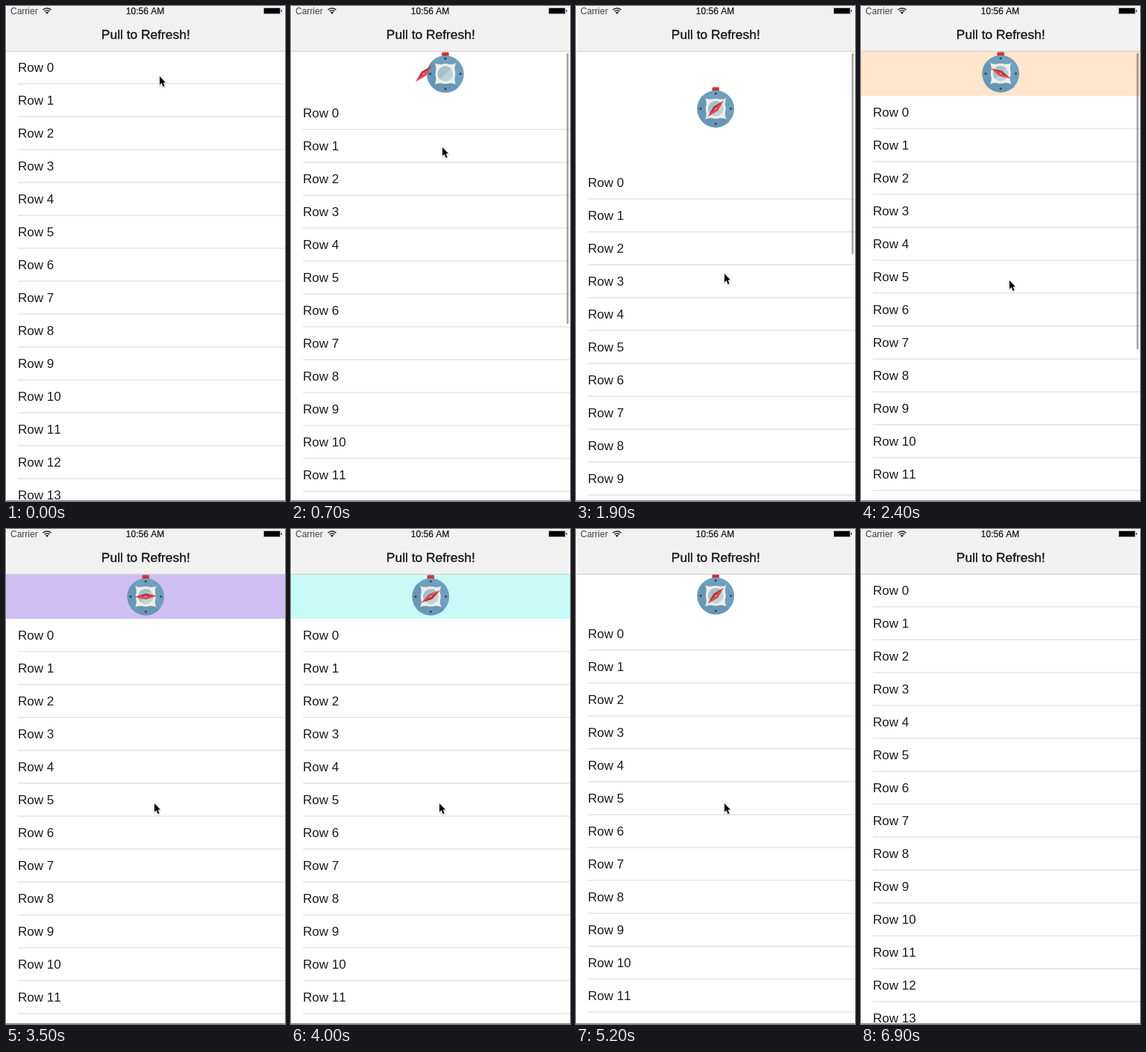
Write an HTML page with a canvas that moves like this. It is 374 px wide and 662 px high and loops after 7.2 s.

```html
<!DOCTYPE html>
<html lang="en">
<head>
<meta charset="utf-8">
<title>Pull to Refresh</title>
<style>
html, body { margin: 0; width: 100%; height: 100%; overflow: hidden; background: #fff; }
canvas { display: block; }
</style>
</head>
<body>
<canvas width="374" height="662"></canvas>
<script>
const ctx = document.querySelector('canvas').getContext('2d');
const W = 374, H = 662, NAV = 60, ROW = 44, LOOP = 7200, TICK = 100;
const PULL = 200, RELEASE = 2050, SETTLED = 2400;
const SPIN = 2160, TURN = 300, SPIN_END = 5160, CLOSE = 5150, CLOSED = 5600;
const MAX_PULL = 158.6, REST = 60;
// orange, magenta, red, blue, purple, cyan
const TINTS = [[255, 128, 0], [255, 0, 255], [255, 0, 0], [0, 0, 255], [128, 0, 128], [0, 255, 255]];

const clamp = (v, a = 0, b = 1) => Math.min(b, Math.max(a, v));
const mix = (a, b, u) => a + (b - a) * u;
const span = (t, a, b) => clamp((t - a) / (b - a));
const smooth = u => u * u * (3 - 2 * u);
const dragEase = t => 1 - (1 - span(t, PULL, RELEASE)) ** 1.35;

function rect(x, y, w, h, color) {
  ctx.fillStyle = color;
  ctx.fillRect(x, y, w, h);
}

function disc(x, y, r, color, from = 0, to = 2 * Math.PI) {
  ctx.fillStyle = color;
  ctx.beginPath();
  ctx.arc(x, y, r, from, to);
  ctx.fill();
}

function shape(points, color) {
  ctx.fillStyle = color;
  ctx.beginPath();
  points.forEach(p => ctx.lineTo(...p));
  ctx.closePath();
  ctx.fill();
}

function text(s, x, y, size, color = '#111', weight = 0, align = 'left') {
  ctx.font = `${size}px "Liberation Sans", Arial, sans-serif`;
  ctx.fontKerning = 'none';
  ctx.textAlign = align;
  ctx.fillStyle = ctx.strokeStyle = color;
  ctx.fillText(s, x, y);
  if (weight) {
    ctx.lineWidth = weight;
    ctx.strokeText(s, x, y);
  }
}

function pullOffset(t) {
  if (t < RELEASE) {
    const d = 273 * dragEase(t);
    return 0.68 * d / (1 + d / 1600);
  }
  if (t < CLOSE) return mix(MAX_PULL, REST, 1 - (1 - span(t, RELEASE, SETTLED)) ** 2.5);
  return REST * (1 - smooth(span(t, CLOSE, CLOSED)));
}

function tint(turns) {
  const i = Math.floor(turns);
  const faded = c => c.map(v => mix(255, v, 0.25));
  const from = i ? faded(TINTS[(i - 1) % 6]) : [255, 255, 255];
  const to = faded(TINTS[i % 6]);
  return `rgb(${from.map((v, k) => Math.round(mix(v, to[k], turns - i)))})`;
}

function compassBody(x, y) {
  ctx.save();
  ctx.translate(x, y);
  ctx.fillStyle = '#d9373c';
  ctx.beginPath();
  ctx.roundRect(-4.5, -28.5, 9.5, 6, 1.5);
  ctx.fill();
  rect(-2.5, -26, 5, 2, '#a8323a');
  disc(0.3, 0.6, 24.8, '#6f9fbe');
  disc(0.3, 0.6, 24.8, '#6897b7', Math.PI / 4, Math.PI * 5 / 4);
  for (let k = 0; k < 4; k++) {
    ctx.save();
    ctx.translate(0.3, 0.3);
    ctx.rotate(k * Math.PI / 2);
    disc(20.3, 0, 1.6, '#4a4446');
    // horn with concave sides
    ctx.rotate(Math.PI / 4);
    ctx.fillStyle = '#eeeee8';
    ctx.beginPath();
    ctx.moveTo(20, 0);
    ctx.quadraticCurveTo(14, -2, 10, -9);
    ctx.lineTo(10, 9);
    ctx.quadraticCurveTo(14, 2, 20, 0);
    ctx.fill();
    ctx.restore();
  }
  disc(0.3, 0.3, 13.3, '#eeeee8');
  disc(0.3, 0.3, 10.3, '#bcd3dc');
  disc(0.3, 0.3, 10.3, '#a5c0cc', Math.PI * 3 / 4, Math.PI * 7 / 4);
  ctx.restore();
}

function needle(x, y, turns) {
  ctx.save();
  ctx.translate(x, y);
  ctx.rotate((turns - 0.5) * Math.PI / 2);
  shape([[-15.5, 0], [0, -4], [15.5, 0]], '#b8323a');
  shape([[-15.5, 0], [0, 4], [15.5, 0]], '#e2474a');
  disc(0, 0, 1.3, '#c9a0a0');
  ctx.restore();
}

function refreshArea(t, off) {
  const spinning = t >= SPIN && t < SPIN_END;
  const turns = spinning ? (t - SPIN) / TURN : 0;
  ctx.save();
  ctx.beginPath();
  ctx.rect(0, NAV, W, off);
  ctx.clip();
  if (spinning) rect(0, NAV, W, off, tint(turns));
  // the two parts slide in from both sides and meet at full pull
  const apart = t < RELEASE ? 1 - clamp(off / 100) : 0;
  const y = NAV + off / 2;
  compassBody(187 + 50 * apart, y);
  needle(187.3 - 24 * apart, y + 0.3, turns);
  ctx.restore();
}

function rows(off) {
  for (let i = 0; i < 20; i++) {
    const y = Math.round(NAV + off) + i * ROW;
    text('Row ' + i, 16, y + 28, 17, '#1a1a1a');
    rect(16, y + ROW - 1, W - 16, 2, '#ebebeb');
  }
}

function scrollBar(t, off) {
  const alpha = span(t, 200, 400) * (1 - span(t, 2400, 2600));
  if (!alpha) return;
  const len = t < RELEASE ? 423 - off : 264.4 + (MAX_PULL - off) * 1.34;
  ctx.fillStyle = `rgba(0,0,0,${0.36 * alpha})`;
  ctx.beginPath();
  ctx.roundRect(369.5, 63, 2.5, len, 1.25);
  ctx.fill();
}

function navBar() {
  rect(0, 0, W, NAV, '#fff');
  rect(1.5, 0.5, W - 3, NAV - 0.5, '#f1f1f1');
  rect(0, NAV, W, 1, '#cfcfcf');
  text('Carrier', 6, 10.5, 12, '#444');
  text('10:56 AM', 186.5, 10.5, 12, '#111', 0.2, 'center');
  text('Pull to Refresh!', 187.3, 44, 17.4, '#111', 0.3, 'center');
  ctx.strokeStyle = '#222';
  ctx.lineWidth = 1.5;
  for (const r of [4.6, 7.6]) {
    ctx.beginPath();
    ctx.arc(55, 10.5, r, -Math.PI * 0.76, -Math.PI * 0.24);
    ctx.stroke();
  }
  shape([[55, 11], [52.8, 8.6], [55, 7.7], [57.2, 8.6]], '#222');
  ctx.strokeStyle = '#aaa';
  ctx.lineWidth = 1;
  ctx.strokeRect(345.5, 2.5, 22, 8);
  rect(346, 3, 21, 7, '#000');
  rect(368.5, 5, 1.5, 3, '#555');
}

function cursorAt(t) {
  if (t < 6500) {
    const e = dragEase(t);
    return [mix(206, 199, clamp(e / 0.75)), mix(93, 366, e)];
  }
  if (t < 6600) return [206, 322];
  if (t < 6700) return [240, 140];
  return [264, 39];
}

function cursor(t) {
  if (t >= 6900) return;
  const [x, y] = cursorAt(t);
  ctx.save();
  ctx.translate(Math.round(x), Math.round(y) + 1);
  ctx.scale(0.88, 0.88);
  ctx.beginPath();
  [[0, 0], [0, 13], [3, 10.3], [5.3, 16], [7.5, 15], [5.2, 9.6], [9, 9.4]].forEach(p => ctx.lineTo(...p));
  ctx.closePath();
  ctx.strokeStyle = '#fff';
  ctx.lineWidth = 1.5;
  ctx.shadowColor = 'rgba(0,0,0,.25)';
  ctx.shadowBlur = 2;
  ctx.shadowOffsetY = 1;
  ctx.stroke();
  ctx.shadowColor = 'transparent';
  ctx.fillStyle = '#000';
  ctx.fill();
  ctx.restore();
}

function draw(t) {
  const off = pullOffset(t);
  rect(0, 0, W, H, '#fff');
  refreshArea(t, off);
  rows(off);
  scrollBar(t, off);
  navBar();
  rect(0, H - 1, W, 1, '#858585');
  cursor(t);
}

const start = performance.now();
function frame() {
  const t = (performance.now() - start) % LOOP;
  draw(Math.floor(t / TICK) * TICK);
  requestAnimationFrame(frame);
}
frame();
</script>
</body>
</html>
```
